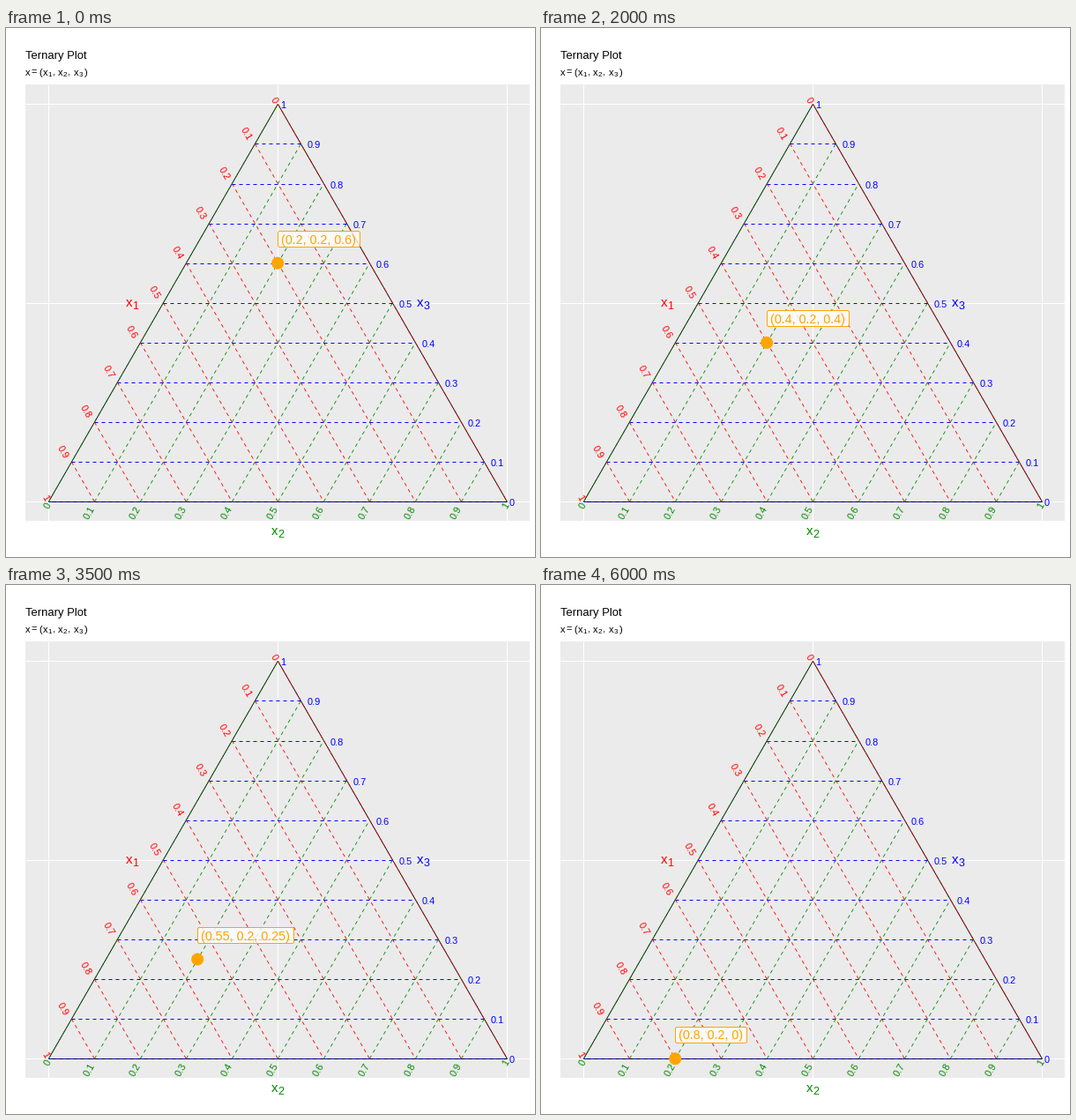
Recreate the animation shown at these times as a matplotlib script. Size 600x600 px, loop 6.1 s.

```python
import math

import matplotlib.pyplot as plt
from matplotlib.animation import FuncAnimation
from matplotlib.patches import Circle, FancyBboxPatch, Rectangle

SIZE, DPI = 600, 100
PX = 72 / DPI  # points per pixel
LEFT, RIGHT, TOP, BASE = 48.4, 568.4, 86.3, 537.3
RED, GREEN, BLUE, ORANGE = "#ff0000", "#008b00", "#0000ff", "#ffa500"
FRAMES, INTERVAL = 61, 100

plt.rcParams["font.family"] = "Liberation Sans"
fig = plt.figure(figsize=(SIZE / DPI, SIZE / DPI), dpi=DPI, facecolor="white")
ax = fig.add_axes([0, 0, 1, 1])
ax.set_xlim(0, SIZE)
ax.set_ylim(SIZE, 0)
ax.axis("off")


def place(x2, x3):
    """Stage position of a ternary point; x1 is the remainder."""
    return LEFT + (RIGHT - LEFT) * (x2 + x3 / 2), BASE - (BASE - TOP) * x3


def line(a, b, color, dashed=False, z=2):
    slanted = a[0] != b[0] and a[1] != b[1]
    width = math.cos(math.pi / 6) if slanted else 1
    style = (0, (4 / width, 4 / width)) if dashed else "-"
    ax.plot([a[0], b[0]], [a[1], b[1]], color=color, lw=width * PX, ls=style,
            dash_capstyle="butt", solid_capstyle="butt", zorder=z)


def write(x, y, text, size, color="black", **kw):
    return ax.text(x, y, text, fontsize=size * PX, color=color,
                   va="baseline", **{"zorder": 4, **kw})


def tick(x, y, text, color, angle=0):
    """Tick label centred on (x, y), turned by angle degrees."""
    a = math.radians(angle)
    write(x + 4 * math.sin(a), y + 4 * math.cos(a), text, 11, color,
          ha="center", rotation=angle, rotation_mode="anchor")


def indexed(x, y, index, color, size, sub, drop):
    write(x, y, "x", size, color)
    write(x + size * 0.52, y + drop, str(index), sub, color)


def draw_panel():
    ax.add_patch(Rectangle((22, 64), 572, 495, fc="#ebebeb", ec="none",
                           antialiased=False, zorder=0))
    for f in (0, 0.5, 1):
        x = LEFT + (RIGHT - LEFT) * f
        y = TOP + (BASE - TOP) * f
        line((x, 64), (x, 559), "white", z=1)
        line((22, y), (594, y), "white", z=1)


def draw_grid():
    corners = [place(0, 0), place(1, 0), place(0, 1)]
    for i in range(3):
        line(corners[i], corners[(i + 1) % 3], "black")
    for k in range(10):
        c = k / 10
        line(place(0, 1 - c), place(1 - c, 0), RED, True)
        line(place(c, 0), place(c, 1 - c), GREEN, True)
        line(place(0, c), place(1 - c, c), BLUE, True)


def draw_ticks():
    for k in range(11):
        c = k / 10
        text = f"{c:g}"
        wide = len(text) > 1
        x, y = place(0, 1 - c)
        dx, dy = (9, 12) if wide else (3.5, 4.5)
        tick(x - dx, y - dy, text, RED, -60)
        x, y = place(c, 0)
        dx, dy = (6, 12.5) if wide else (2, 4.5)
        tick(x - dx, y + dy, text, GREEN, 60)
        x, y = place(1 - c, c)
        tick(x + (14.5 if wide else 5.7), y + 1, text, BLUE)


def draw_titles():
    write(22, 35, "Ternary Plot", 13)
    for x, text in ((22, "x"), (28.6, "="), (37, "("), (52, ","),
                    (69.5, ","), (88.5, ")")):
        write(x, 53.5, text, 11)
    for i, x in enumerate((41.5, 59, 76.5), 1):
        indexed(x, 53.5, i, "black", 11, 8, 1.5)
    indexed(135.5, 316, 1, RED, 15, 12.5, 3)
    indexed(300.5, 575, 2, GREEN, 15, 12.5, 3)
    indexed(465.5, 316, 3, BLUE, 15, 12.5, 3)


draw_panel()
draw_grid()
draw_ticks()
draw_titles()

dot = ax.add_patch(Circle((0, 0), 7, fc=ORANGE, ec="none", zorder=5))
box = ax.add_patch(FancyBboxPatch((0, 0), 94, 18,
                                  boxstyle="round,pad=0,rounding_size=2",
                                  fc=(1, 1, 1, 0.8), ec=ORANGE, lw=PX,
                                  zorder=6))
label = write(0, 0, "", 14.45, ORANGE, zorder=7)


def update(i):
    values = (20 + i, 20, 60 - i)
    x, y = place(values[1] / 100, values[2] / 100)
    dot.center = (x - 0.2, y)
    label.set_text("(" + ", ".join(f"{v / 100:g}" for v in values) + ")")
    label.set_position((x + 4, y - 22))
    box.set_x(round(x) + 0.5)
    box.set_y(round(y - 36.5) + 0.5)
    box.set_width(round(label.get_window_extent().width + 8))
    return dot, box, label


anim = FuncAnimation(fig, update, frames=FRAMES, interval=INTERVAL,
                     init_func=lambda: update(0), repeat=True,
                     repeat_delay=0, blit=False)
plt.show()
```
